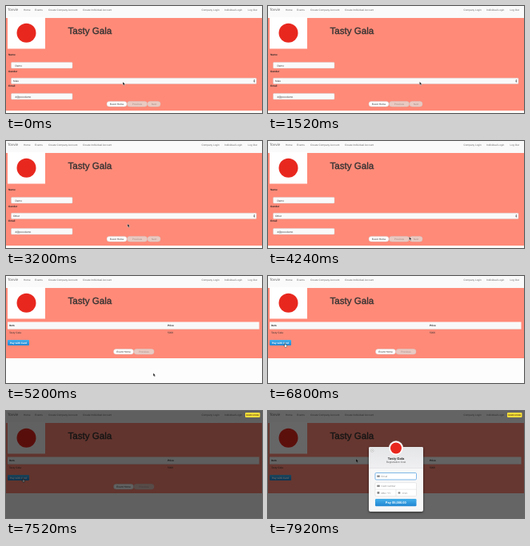
An HTML page for the animation above (8000 ms loop, 320 by 134 pixels).

```html
<!DOCTYPE html>
<html lang="en">
<head>
<meta charset="utf-8">
<title>Event registration</title>
<style>
  html, body { margin: 0; width: 100%; height: 100%; overflow: hidden; background: #fff; }
  svg { display: block; width: 100vw; height: 100vh; }
  text {
    font: 3.2px "Liberation Sans", Arial, sans-serif;
    fill: #333; text-rendering: geometricPrecision; white-space: pre;
  }
  .nav text { fill: #666; }
  .nav .brand { font-size: 4.6px; }
  .title { font-size: 11.6px; fill: #333; stroke: #333; stroke-width: .35; }
  .bold { font-weight: bold; fill: #222; }
  .mid { text-anchor: middle; }
  .field { fill: #fafafa; stroke: #ccc; stroke-width: .4; }
  .pill { fill: #fff; stroke: #ccc; stroke-width: .4; }
  .off rect { fill: #e9c9c1; }
  .off text { fill: #a08c88; }
  .hint { font-size: 3.1px; fill: #8a8a8a; }
  .box { fill: #fff; stroke: #ccc; stroke-width: .4; }
  .icon { fill: #888; }
  .shadow { filter: drop-shadow(0 1.5px 1.5px rgba(0, 0, 0, .55)); }
</style>
</head>
<body>
<svg viewBox="0 0 320 134" preserveAspectRatio="none">
  <defs>
    <linearGradient id="blue" x2="0" y2="1">
      <stop offset="0" stop-color="#45b0ea"/><stop offset="1" stop-color="#2286d2"/>
    </linearGradient>
    <linearGradient id="head" x2="0" y2="1">
      <stop offset="0" stop-color="#e4e5e7"/><stop offset="1" stop-color="#f0f0f2"/>
    </linearGradient>
  </defs>

  <rect width="320" height="134" fill="#fdfdfd"/>
  <rect id="panel" y="15" width="320" height="116" fill="#ff8a78"/>
  <g class="nav">
    <rect width="320" height="15" fill="#fafafa"/>
    <text class="brand" x="2" y="6.4">Tovvie</text>
    <text x="22" y="6">Home</text>
    <text x="36" y="6">Events</text>
    <text x="53" y="6">Create Company Account</text>
    <text x="96" y="6">Create Individual Account</text>
    <text x="244.5" y="6">Company Login</text>
    <text x="273" y="6">Individual Login</text>
    <text x="302.5" y="6">Log Out</text>
  </g>
  <rect x="2" y="14" width="47" height="39.5" fill="#fff"/>
  <circle cx="25.5" cy="33.7" r="12" fill="#e8281f"/>
  <text class="title" x="77.5" y="34.5">Tasty Gala</text>

  <g id="form">
    <text class="bold" x="3" y="62.3">Name</text>
    <rect class="field" x="6.5" y="70.5" width="76.5" height="7.5" rx="1"/>
    <text x="11.5" y="75.5">Demo</text>
    <text class="bold" x="3" y="83.4">Gender</text>
    <rect class="field" x="6.5" y="90.3" width="306.5" height="7.2" rx="1"/>
    <text id="choice" x="9" y="95.1">Male</text>
    <path d="M309.3 93.5l1-1.4 1 1.4zM309.3 94.3l1 1.4 1-1.4z" fill="#444"/>
    <text class="bold" x="3" y="101.4">Email</text>
    <rect class="field" x="6.5" y="109.5" width="76.5" height="7.5" rx="1"/>
    <text x="11.5" y="114.5">d@post.demo</text>
    <g>
      <rect class="pill" x="126" y="119.4" width="25" height="6.6" rx="3.3"/>
      <text class="mid" x="138.5" y="123.9">Event Home</text>
    </g>
    <g class="off">
      <rect class="pill" x="151.5" y="119.4" width="25" height="6.6" rx="3.3"/>
      <text class="mid" x="164" y="123.9">Previous</text>
      <rect class="pill" x="177" y="119.4" width="16" height="6.6" rx="3.3"/>
      <text class="mid" x="185" y="123.9">Next</text>
    </g>
    <g id="menu">
      <rect x="2" y="90" width="197" height="16.2" rx="1" fill="#f6f6f6" stroke="#bbb" stroke-width=".4"/>
      <rect id="bar" x="2" width="197" height="4.9" fill="#2f73e6"/>
      <path d="M5.8 93.9l.8 1 1.2-2.1" fill="none" stroke="#333" stroke-width=".5"/>
      <text x="9" y="94.9">Male</text>
      <text x="9" y="99.8">Female</text>
      <text x="9" y="104.7">Other</text>
    </g>
  </g>

  <g id="pay">
    <rect x="2" y="57.5" width="314.5" height="9" fill="#f9f9f9"/>
    <rect x="2" y="66.5" width="314.5" height=".5" fill="#ddd"/>
    <text class="bold" x="4" y="63.4">Item</text>
    <text class="bold" x="202" y="63.4">Price</text>
    <text x="4" y="72.3">Tasty Gala</text>
    <text x="202" y="72.3">5000</text>
    <rect x="2" y="80" width="27" height="7" rx="1" fill="url(#blue)"/>
    <text class="mid" x="15.5" y="84.7" style="fill:#fff;font-weight:bold">Pay with Card</text>
    <rect class="pill" x="134.5" y="91.5" width="25" height="6.5" rx="3.2"/>
    <text class="mid" x="147" y="95.9">Event Home</text>
    <g class="off">
      <rect class="pill" x="160" y="91.5" width="25" height="6.5" rx="3.2"/>
      <text class="mid" x="172.5" y="95.9">Previous</text>
    </g>
  </g>

  <g id="cursor">
    <path id="arrow" d="M0 0v4l1-.8.7 1.6.8-.3-.7-1.6h1.2z" fill="#111" stroke="#fff" stroke-width=".35"/>
    <path id="hand" d="M-.5 0h.8v2l1.8.5v1.6l-.6 1.1h-2l-1.3-1.9.5-.4.8.6z" fill="#fff" stroke="#111" stroke-width=".4"/>
  </g>

  <rect id="shade" width="320" height="134"/>
  <g id="badge">
    <rect x="299" y="2" width="18.5" height="6" rx="1" fill="#ffdf3a"/>
    <text class="mid bold" x="308.2" y="6" style="font-size:2.6px;fill:#5a4a10">DEMO MODE</text>
  </g>

  <g id="modal">
    <rect class="shadow" x="126" y="45" width="68" height="81" rx="2" fill="#f7f7f8"/>
    <path d="M126 72V47a2 2 0 0 1 2-2h64a2 2 0 0 1 2 2v25z" fill="url(#head)"/>
    <rect x="126" y="71.6" width="68" height=".4" fill="#d2d3d6"/>
    <circle cx="160" cy="46.5" r="9" fill="#fff" stroke="#ddd" stroke-width=".4"/>
    <circle cx="160" cy="46.5" r="7" fill="#e8281f"/>
    <circle cx="130.3" cy="49.7" r="1.7" fill="#fff" stroke="#999" stroke-width=".4"/>
    <path d="M129.7 49.1l1.2 1.2m0-1.2l-1.2 1.2" stroke="#777" stroke-width=".4"/>
    <text class="mid bold" x="160" y="60.9" style="font-size:4.1px">Tasty Gala</text>
    <text class="mid" x="160" y="65.2" style="fill:#555">Registration Cost</text>
    <rect class="box" x="134" y="77.5" width="51.5" height="8.5" rx="1.2" style="stroke:#4a9be0;stroke-width:.7"/>
    <rect class="icon" x="136.3" y="80.5" width="3.4" height="2.4"/>
    <text class="hint" x="141.5" y="82.9">Email</text>
    <rect class="box" x="134" y="89.7" width="51.5" height="17" rx="1.2"/>
    <path d="M134 98.2h51.5M160 98.2v8.5" stroke="#ccc" stroke-width=".4"/>
    <rect class="icon" x="136.3" y="92.7" width="3.4" height="2.4"/>
    <text class="hint" x="141.5" y="95">Card number</text>
    <rect class="icon" x="136.5" y="101" width="2.8" height="2.8"/>
    <text class="hint" x="141.5" y="103.5">MM / YY</text>
    <rect class="icon" x="162.7" y="101.4" width="2.6" height="2.2"/>
    <text class="hint" x="168" y="103.5">CVC</text>
    <rect x="134" y="110" width="51.5" height="9.2" rx="1.2" fill="url(#blue)"/>
    <text class="mid" x="159.8" y="116" style="font-size:4px;font-weight:bold;fill:#fff">Pay $5,000.00</text>
  </g>
</svg>
<script>
const LOOP = 8000, STEP = 80;
const $ = id => document.getElementById(id);

// Rows: time, then values
const path = [
  [400, 146, 95], [880, 202, 99], [960, 202, 99], [1840, 184, 93],
  [2000, 184, 93], [2400, 182, 101], [2880, 182, 101], [3760, 82, 110],
  [4080, 163, 118], [4240, 176.5, 120], [4640, 184, 121.5], [5440, 184, 121.5],
  [6320, 40, 90], [6720, 21.5, 84], [7520, 21.5, 84], [7920, 110, 60]
];
const dim = [[7200, 0], [7280, .1], [7360, .25], [7520, .62], [7920, .6]];
const badgeFade = [[7200, 0], [7360, .8], [7520, 1]];
const modalFade = [[7520, 0], [7840, 1]];

function at(rows, t) {
  if (t <= rows[0][0]) return rows[0].slice(1);
  const i = rows.findIndex(r => r[0] >= t);
  if (i < 0) return rows[rows.length - 1].slice(1);
  const a = rows[i - 1], b = rows[i];
  let k = (t - a[0]) / (b[0] - a[0]);
  if (a.length > 2) k = k * k * (3 - 2 * k);
  return a.slice(1).map((v, n) => v + (b[n + 1] - v) * k);
}

const show = (id, on) => { $(id).style.display = on ? "" : "none"; };

function draw(t) {
  const paid = t >= 4960;
  show("form", !paid);
  show("pay", paid);
  $("panel").setAttribute("height", paid ? 88 : 116);

  show("menu", t >= 1920 && t < 2800);
  const row = t < 2160 ? 0 : t < 2320 ? 1 : 2;
  $("bar").setAttribute("y", 91 + row * 4.9);
  show("bar", t !== 2720);
  $("choice").textContent = t < 2720 ? "Male" : "Other";

  $("shade").style.opacity = at(dim, t)[0];
  $("badge").style.opacity = at(badgeFade, t)[0];
  const [m] = at(modalFade, t);
  $("modal").style.opacity = m;
  $("modal").setAttribute("transform", `translate(0 ${(1 - m) * 5})`);

  const [x, y] = at(path, t);
  $("cursor").setAttribute("transform", `translate(${x} ${y})`);
  const hand = t >= 6720 && t < 7600;
  show("hand", hand);
  show("arrow", !hand);
}

let start;
function tick(now) {
  start ??= now;
  draw(Math.floor(((now - start) % LOOP) / STEP) * STEP);
  requestAnimationFrame(tick);
}
draw(0);
requestAnimationFrame(tick);
</script>
</body>
</html>
```
